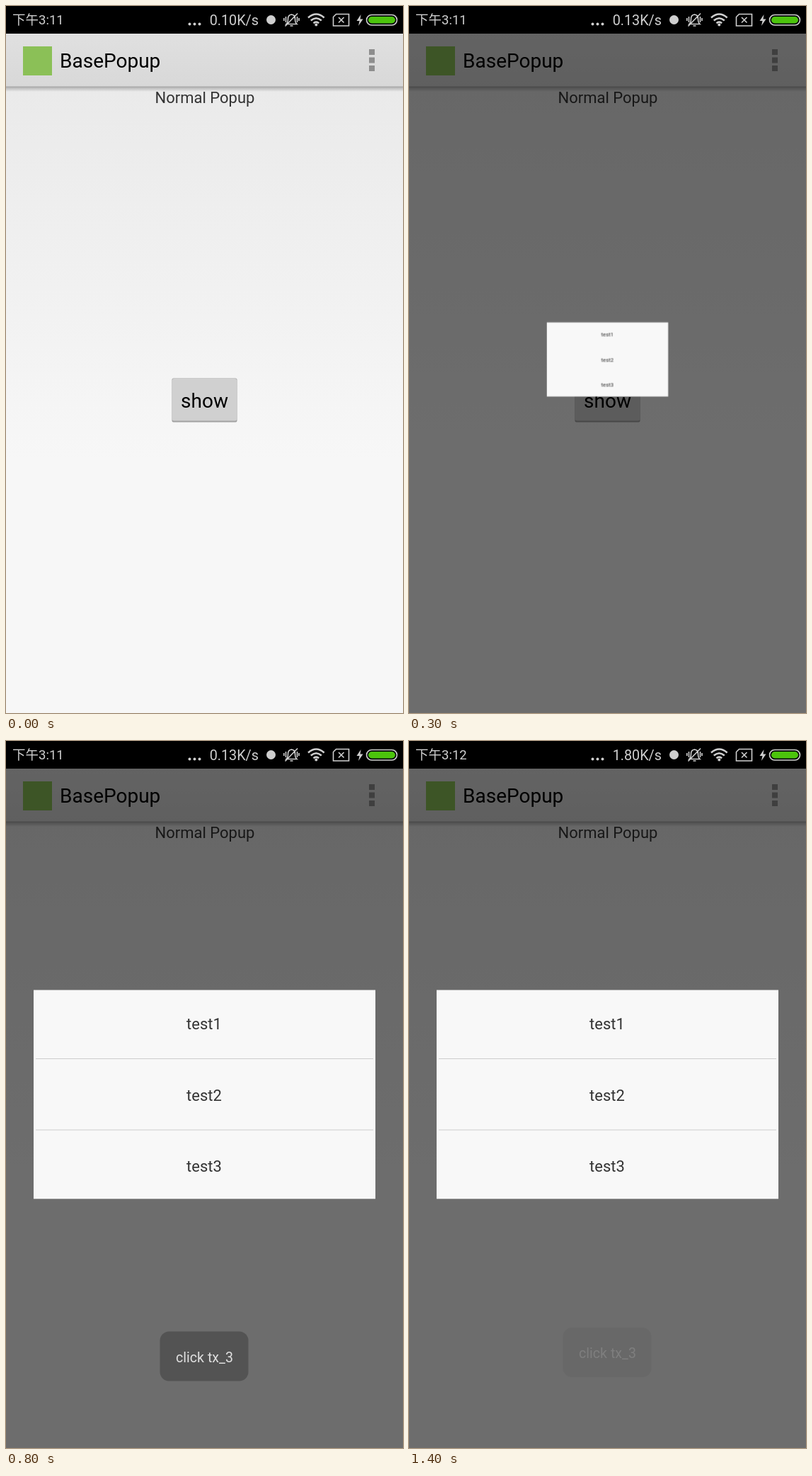
An HTML page for the animation above (1.5 s loop, 561 by 998 pixels).

```html
<!DOCTYPE html>
<html lang="en">
<head>
<meta charset="utf-8">
<title>BasePopup</title>
<style>
  html, body { margin: 0; width: 100%; height: 100%; overflow: hidden; background: #f7f7f7; }
  svg { display: block; width: 561px; height: 998px; font-family: Roboto, "Noto Sans CJK SC", "Noto Sans CJK", sans-serif; }
  .mid { text-anchor: middle; }
  #popup { transform-origin: 280.5px 499px; }
  .line { fill: none; stroke: #cfcfcf; stroke-width: 1.6; }
</style>
</head>
<body>
<svg viewBox="0 0 561 998">
  <defs>
    <linearGradient id="page" x1="0" y1="115" x2="0" y2="640" gradientUnits="userSpaceOnUse">
      <stop offset="0" stop-color="#eaeaea"/>
      <stop offset="1" stop-color="#f7f7f7"/>
    </linearGradient>
    <linearGradient id="bar" x1="0" y1="0" x2="0" y2="1">
      <stop offset="0" stop-color="#e0e0e0"/>
      <stop offset="1" stop-color="#d8d8d8"/>
    </linearGradient>
    <linearGradient id="shade" x1="0" y1="0" x2="0" y2="1">
      <stop offset="0" stop-opacity=".22"/>
      <stop offset="1" stop-opacity="0"/>
    </linearGradient>
  </defs>

  <g id="screen">
    <rect width="561" height="998" fill="url(#page)"/>
    <rect y="39" width="561" height="75" fill="url(#bar)"/>
    <rect y="113.5" width="561" height="1.5" fill="#aaa"/>
    <rect y="115" width="561" height="6" fill="url(#shade)"/>
    <rect x="24" y="57" width="41" height="41" fill="#8bc057"/>
    <text x="76" y="87" font-size="28">BasePopup</text>
    <path d="M513 61h8v8h-8zM513 72.500h8v8h-8zM513 84h8v8h-8z" fill="#8e8e8e"/>
    <text class="mid" x="281" y="137" font-size="22" fill="#333">Normal Popup</text>
    <rect x="234.500" y="525.500" width="92" height="62" rx="2" fill="#a2a2a2"/>
    <rect x="235" y="526" width="91" height="59.500" rx="2" fill="#d0d0d0"/>
    <text class="mid" x="280.500" y="567" font-size="28">show</text>
  </g>

  <rect id="dim" y="39" width="561" height="959" opacity="0" fill-opacity=".555"/>

  <g id="popup" opacity="0">
    <rect x="39" y="351.500" width="483" height="294.800" fill="#f8f8f8"/>
    <path id="rules" d="M42 448.500H519M42 549H519" stroke="#cdcdcd"/>
    <g class="mid" font-size="22" fill="#333">
      <text x="280" y="407">test1</text>
      <text x="280" y="507.500">test2</text>
      <text x="280" y="608">test3</text>
    </g>
  </g>

  <g id="toast" opacity="0">
    <rect x="217.500" y="825.500" width="125" height="70" rx="13" fill="#4f4f4f"/>
    <text class="mid" x="280.500" y="868.500" font-size="19.600" fill="#f4f4f4">click tx_3</text>
  </g>

  <g id="status">
    <rect width="561" height="39"/>
    <g fill="#cfcfcf" font-size="18.500">
      <text id="clockA" x="9" y="26">下午3:11</text>
      <text id="clockB" x="9" y="26" opacity="0">下午3:12</text>
      <g font-size="19.800" text-anchor="end">
        <text id="rateA" x="357" y="27">0.10K/s</text>
        <text id="rateB" x="357" y="27" opacity="0">0.13K/s</text>
        <text id="rateC" x="357" y="27" opacity="0">1.80K/s</text>
      </g>
      <circle cx="259.500" cy="25.500" r="2"/>
      <circle cx="266.500" cy="25.500" r="2"/>
      <circle cx="273.500" cy="25.500" r="2"/>
      <circle cx="374.500" cy="19.500" r="6.500"/>
    </g>
    <g class="line">
      <path d="M396 25.500q2.500-2 2.500-7q0-6 5-6.500q5 .5 5 6.500q0 5 2.500 7zM401.500 28h4M394.500 28.500L412 10.500M395.500 15v8M392.800 17v4M411.500 15v8M414 17v4"/>
      <path d="M466.500 11.500H484.500V28H462.500V15.500zM470 16l7.500 7.500M477.500 16l-7.500 7.500"/>
      <g stroke-width="2.600">
        <path d="M427 16.500q11.300-10 22.600 0"/>
        <path d="M430.800 20.500q7.500-6.500 15 0"/>
        <path d="M434.500 24.200q3.800-3.200 7.600 0"/>
      </g>
    </g>
    <circle cx="438.300" cy="26.600" r="2" fill="#cfcfcf"/>
    <path d="M501.500 12L495.500 21H499.500L498 28L504.500 18.500H500.500z" fill="#cfcfcf"/>
    <rect x="509.500" y="12.500" width="43" height="14.500" rx="7.250" class="line"/>
    <rect x="512" y="15" width="38" height="9.500" rx="4.750" fill="#4cc40c"/>
  </g>
</svg>
<script>
  const LOOP = 1500;
  const hold = 'step-end';

  // steps: [ms, value] pairs, each value held until the next time
  function play(id, prop, steps) {
    const frames = steps.map(([ms, value]) => ({ offset: ms / LOOP, [prop]: value, easing: hold }));
    frames.push({ ...frames[frames.length - 1], offset: 1 });
    document.getElementById(id).animate(frames, { duration: LOOP, iterations: Infinity });
  }

  const show = (id, from, to = LOOP) => {
    const steps = from ? [[0, 0], [from, 1]] : [[0, 1]];
    if (to < LOOP) steps.push([to, 0]);
    play(id, 'opacity', steps);
  };

  show('rateA', 0, 100);
  show('rateB', 100, 1300);
  show('rateC', 1300);
  show('clockA', 0, 1300);
  show('clockB', 1300);

  show('dim', 200);
  show('popup', 200);
  show('rules', 500);
  const grow = ms => Math.min(1, 0.043 + 0.312 * (ms - 200) / 100);
  play('popup', 'transform', [
    [0, 'scale(0)'],
    ...[200, 300, 400].map(ms => [ms, `scale(${grow(ms)})`]),
    [500, 'scale(1)']
  ]);

  const drop = y => `translateY(${y}px)`;
  play('toast', 'opacity', [[0, 0], [700, 0.25], [800, 0.85], [900, 1], [1300, 0.65], [1400, 0.13]]);
  play('toast', 'transform', [[0, drop(36)], [700, drop(36)], [800, drop(8)], [900, drop(0)], [1300, drop(1)], [1400, drop(2.5)]]);
</script>
</body>
</html>
```
